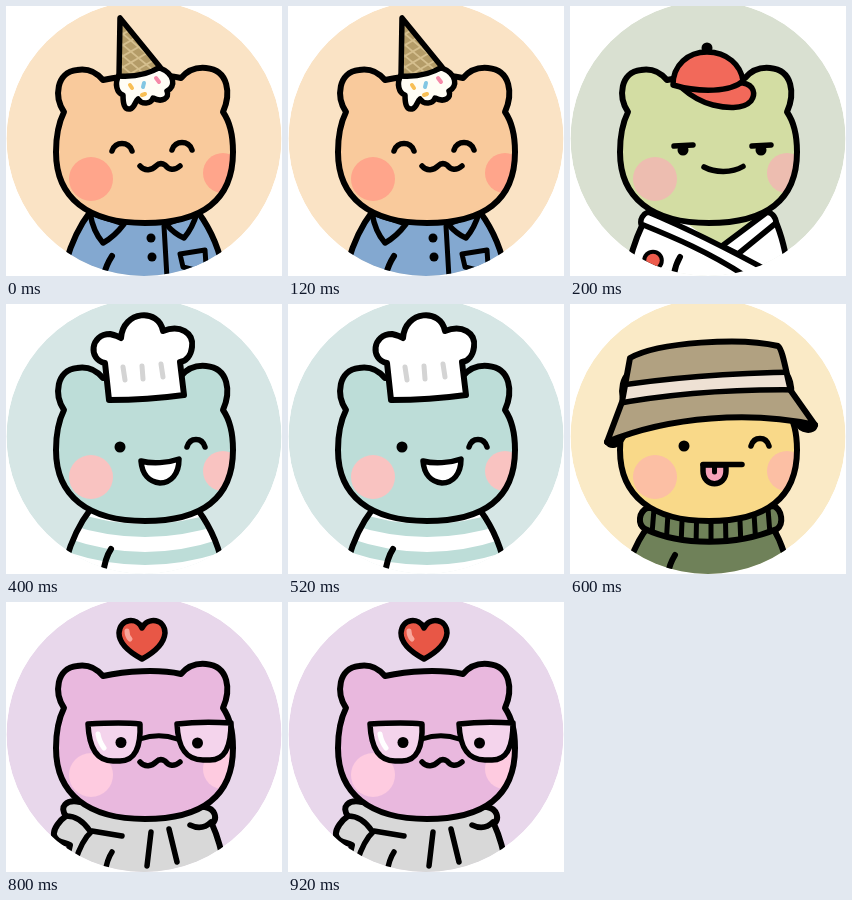
Animation, 276 px wide and 270 px high, one loop 1 s. Source, as an HTML page with a canvas:

```html
<!DOCTYPE html>
<html lang="en">
<head>
<meta charset="utf-8">
<title>Bear outfits</title>
<style>
html, body { margin: 0; width: 100%; height: 100%; overflow: hidden; background: #fff; }
canvas { display: block; width: 276px; height: 270px; }
</style>
</head>
<body>
<canvas id="stage" width="276" height="270"></canvas>
<script>
const ctx = document.getElementById('stage').getContext('2d');
const INK = '#000';
const STEP = 200;

const HEAD = new Path2D('M58 106C48 91 50 66 71 64C82 62 91 67 97 74C120 69 152 67 175 72C181 65 190 61 200 62C223 64 225 88 217 106C224 116 227 130 227 146C227 195 195 217 139 217C82 217 50 192 50 146C50 130 53 116 58 106Z');
const BODY = 'M84 206C74 219 66 235 60 256L60 285H220C218 257 209 229 192 206Z';

function shape(d, fill, stroke = INK, width = 6) {
  const path = d instanceof Path2D ? d : new Path2D(d);
  if (fill) { ctx.fillStyle = fill; ctx.fill(path); }
  if (stroke) { ctx.strokeStyle = stroke; ctx.lineWidth = width; ctx.stroke(path); }
}

function line(d, width = 6, color = INK) { shape(d, null, color, width); }

function dot(x, y, r, fill = INK) {
  ctx.beginPath();
  ctx.arc(x, y, r, 0, Math.PI * 2);
  ctx.fillStyle = fill;
  ctx.fill();
}

function clipped(d, draw) {
  ctx.save();
  ctx.clip(d instanceof Path2D ? d : new Path2D(d));
  draw();
  ctx.restore();
}

function head(skin, cheek) {
  shape(HEAD, skin, null);
  clipped(HEAD, () => {
    dot(85, 173, 22, cheek);
    dot(217, 167, 20, cheek);
  });
  shape(HEAD, null);
}

const arcEye = (x, y, w = 9) =>
  line(`M${x - w} ${y}C${x - w + 3} ${y - 10} ${x + w - 3} ${y - 10} ${x + w} ${y}`, 5.5);
const wavyMouth = () => line('M134 160C139 166 146 164 150 160C153 157 156 157 159 159C163 164 168 165 174 160', 5.5);
const arm = () => line('M106 250C102 256 99 263 97 272');

function iceCream() {
  shape(BODY, '#83a8d0');
  arm();
  line('M158 220L161 272', 5);
  shape('M84 207C86 219 90 229 97 237C104 233 112 226 118 218Z', '#83a8d0', INK, 5.5);
  shape('M160 218C165 224 171 229 178 232C184 225 188 217 191 207Z', '#83a8d0', INK, 5.5);
  dot(145, 232, 4.5);
  dot(146, 251, 4.5);
  shape('M174 248L199 244L200 259L189 264L177 261Z', '#83a8d0', INK, 5);
  head('#f9ca9c', '#ffa58b');
  arcEye(116, 145, 10);
  arcEye(176, 144, 10);
  wavyMouth();

  shape('M113 69C108 78 111 87 117 89C117 97 118 104 124 103C129 102 129 95 132 93C136 99 145 98 147 92C156 97 164 92 161 85C170 81 169 68 154 62Z', '#fffdf5', INK, 5.5);
  line('M124 79L126 82', 4, '#f8bf55');
  line('M138 77L137 81', 4, '#83c7e3');
  line('M150 72L153 76', 4, '#f58aa9');
  line('M136 89L139 88', 4, '#f8bf55');
  const cone = 'M114 12L113 70C129 71 143 68 154 61Z';
  shape(cone, '#b49c68', null);
  clipped(cone, () => {
    for (let i = 0; i < 7; i++) {
      const y = 18 + i * 11;
      line(`M105 ${y + 6}L160 ${y - 26}M105 ${y - 22}L160 ${y + 24}`, 1.8, '#d5bf8e');
    }
  });
  line(cone, 5.5);
}

function redCap() {
  const skin = '#d3dda3';
  shape('M78 208C70 222 64 237 59 257V285H221C218 255 214 234 205 214Z', '#fff');
  shape('M100 205H196L152 243Z', skin, null);
  shape('M196 207C201 205 206 211 206 217L168 248L152 240Z', '#fff', INK, 5.5);
  shape('M78 206C73 208 70 213 71 218C103 231 139 246 177 271L204 268C162 245 121 224 78 206Z', '#fff', INK, 5.5);
  line('M110 251C107 256 105 262 104 268');
  dot(83, 254.5, 10.8);
  dot(83, 254.5, 6.8, '#ed5b4c');
  head(skin, '#edbdb0');
  for (const x of [113, 191]) {
    line(`M${x - 9} 140L${x + 10} 139`, 5.5);
    dot(x, 144, 5.5);
  }
  line('M134 161C145 167 162 167 173 160.5', 5.5);

  dot(137, 42, 5.5);
  shape('M112 82C126 76 152 75 173 77C184 79 186 88 181 95C173 104 155 102 143 99C131 96 121 90 112 82Z', '#f2695a', INK, 5.5);
  shape('M103 79C103 59 118 46 137 46C157 46 171 59 173 75C161 86 130 87 103 79Z', '#f2695a', INK, 5.5);
}

function chef() {
  shape(BODY, '#fff', null);
  clipped(BODY, () => {
    for (const y of [209, 237]) line(`M50 ${y}Q139 ${y + 35} 228 ${y}`, 13, '#bdddd8');
  });
  line(BODY);
  line('M105 245C101 251 98 260 97 272');
  head('#bdddd8', '#f9c3c1');
  dot(114, 143, 5.5);
  arcEye(190, 143);
  shape('M135 157C146 160 162 159 173 155C173 170 165 179 154 179C143 178 136 170 135 157Z', '#fff', INK, 5.5);

  shape('M103 96L99 59C82 56 84 30 104 30C108 31 112 32 115 34C117 6 153 4 157 27C174 20 188 29 186 43C185 52 180 57 174 58L178 91Q142 96 103 96Z', '#fff');
  line('M117 63L119 76M136 62L137 75M155 60L157 73', 5, '#d4d4d4');
}

function bucketHat() {
  const green = '#6f8159';
  shape('M79 222C71 231 65 243 60 257V285H221C218 256 212 239 202 222Z', green);
  line('M105 251C102 256 99 262 98 270');
  const collar = 'M77 204C69 208 67 220 75 225C111 242 166 242 207 225C214 220 212 206 204 202Z';
  shape(collar, green, null);
  clipped(collar, () => {
    for (let i = 0; i < 9; i++) {
      const u = i / 4 - 1;
      const x = 141 + u * 57;
      line(`M${x} 205L${x + u * 3} 242`, 5);
    }
  });
  line(collar);
  head('#f9d989', '#fcbfa4');
  dot(114, 142, 5.5);
  arcEye(190, 142);
  shape('M133 161V167C133 184 156 184 156 167V161Z', '#f6a2b8', INK, 5.5);
  line('M144.5 162V168', 5);
  line('M133 160.5H172', 5.5);

  shape('M37 138C41 143 48 142 53 133Z', INK);
  shape('M227 118C231 128 244 128 245 121Z', INK);
  const hat = 'M60 54C88 38 172 33 208 42C213 45 217 74 221 87L245 121C182 107 100 112 37 138L52 98Z';
  shape(hat, '#b1a181', null);
  clipped(hat, () => {
    shape('M40 83C95 74 160 69 230 68V86C162 85 103 89 40 101Z', '#eee1d4', INK, 5.5);
  });
  line(hat);
}

function glasses() {
  const gray = '#d8d8d8';
  shape('M74 200C60 197 53 205 60 214C54 218 47 227 48 233C50 241 59 240 64 243L61 256V285H222C218 257 214 239 206 222C212 216 209 207 199 205Z', gray);
  line('M60 214C70 214 78 220 84 229M116 234L86 229C78 236 73 247 69 260', 5.5);
  line('M106 250C102 256 100 263 99 272M145 230L141 264M163 227L171 260M184 223C192 227 199 226 205 220', 5.5);
  head('#e9b8de', '#fecbe0');
  const lenses = [
    'M82 122C98 121 118 120 134 122C135 145 129 159 114 159H107C91 159 83 146 82 122Z',
    'M171 122C188 120 208 120 225 121C225 145 219 158 204 158H197C179 158 172 145 171 122Z'
  ];
  for (const lens of lenses) shape(lens, '#f4d4ec', INK, 5.5);
  line('M92 132C93 138 95 142 98 146', 5, '#fff');
  line('M134 137C146 133 160 133 171 137', 5);
  dot(115, 140.5, 5.5);
  dot(191.5, 141, 5.5);
  wavyMouth();

  shape('M136 57C123 50 113 42 113 31C114 16 131 15 136 26C142 14 159 17 159 31C158 42 149 50 136 57Z', '#e85746', INK, 5.5);
  line('M121 29C121 32 122 35 124 37', 5, '#f8a69b');
}

const scenes = [
  ['#fae3c5', iceCream],
  ['#d9e0d1', redCap],
  ['#d6e6e5', chef],
  ['#faeac6', bucketHat],
  ['#e8d7eb', glasses]
];

ctx.lineCap = ctx.lineJoin = 'round';
const disc = new Path2D();
disc.arc(138, 132.5, 137.5, 0, Math.PI * 2);
let shown = -1;

function frame() {
  const i = Math.floor(performance.now() / STEP) % scenes.length;
  if (i !== shown) {
    shown = i;
    const [back, draw] = scenes[i];
    ctx.fillStyle = '#fff';
    ctx.fillRect(0, 0, 276, 270);
    clipped(disc, () => {
      shape(disc, back, null);
      draw();
    });
  }
  requestAnimationFrame(frame);
}
frame();
</script>
</body>
</html>
```
